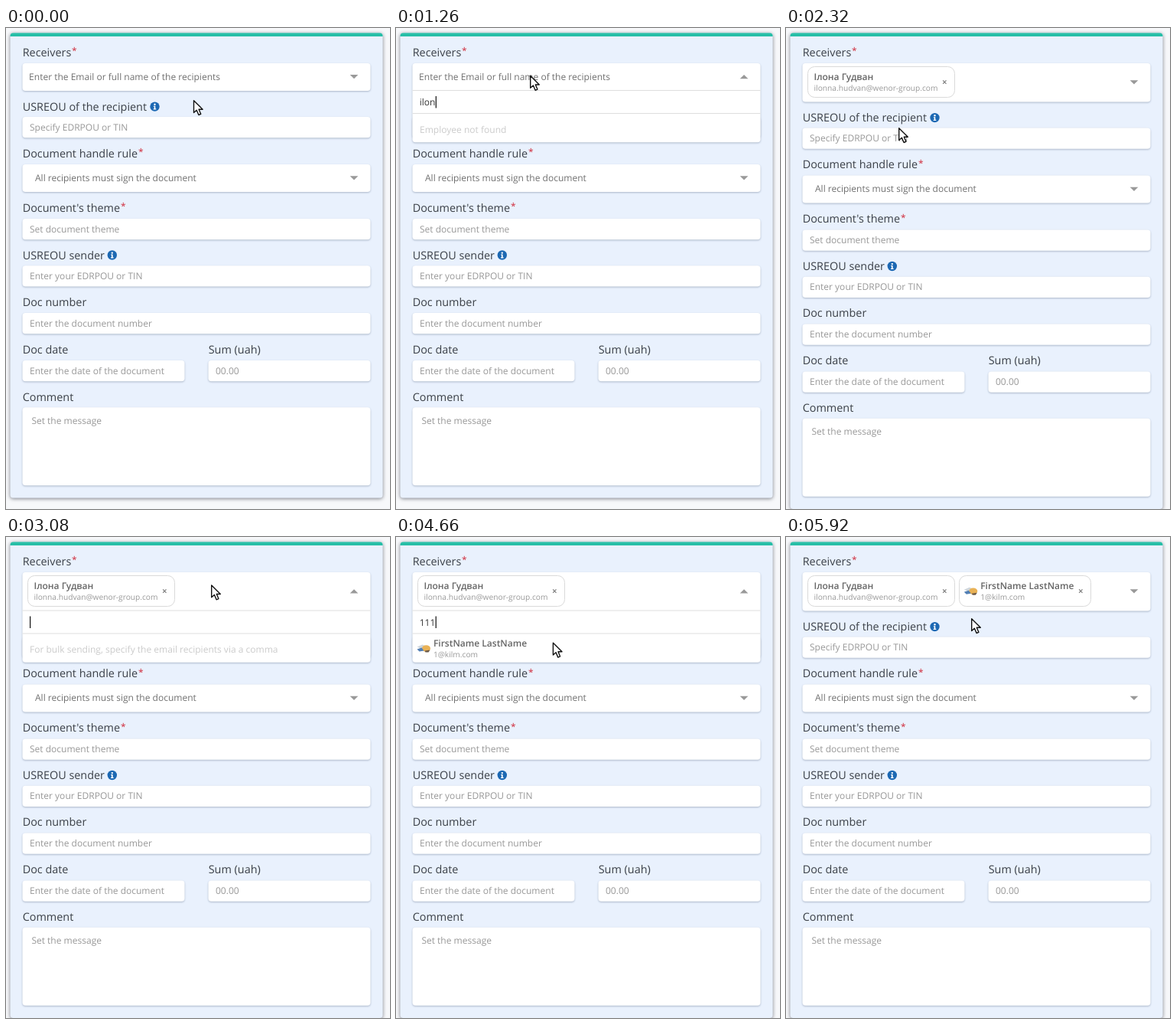
These frames come from a looping animation (502x628 px, 5.94 s). An HTML page:

```html
<!DOCTYPE html>
<html lang="en">
<head>
<meta charset="utf-8">
<title>Document form</title>
<style>
html, body { margin: 0; width: 100%; height: 100%; overflow: hidden; background: #f7f8fa; }
svg { display: block; width: 502px; height: 628px; font: 12.03px "Open Sans", "Noto Sans", sans-serif; text-rendering: geometricPrecision; }
.card { fill: #e9f1fd; filter: drop-shadow(0 1px 2.5px rgba(50, 55, 70, .65)); }
.field { fill: #fff; filter: drop-shadow(0 1px 1.1px rgba(50, 70, 100, .34)); }
.label { font-size: 14.4px; fill: #3b4047; }
.star { font-size: 12px; fill: #d02c3c; }
.hint { fill: #989898; }
.value { fill: #707070; }
.faint { fill: #cbcbcb; }
.typed { fill: #333; }
.name { font-weight: 600; fill: #666; }
.mail { font-size: 10.2px; fill: #999; }
.chip { fill: #fff; stroke: #dadada; }
.cross { stroke: #777; stroke-width: 1.1; }
.line { stroke: #dedede; }
.arrow { fill: #999; }
</style>
</head>
<body>
<svg id="stage" viewBox="0 0 502 628"></svg>
<script>
const LOOP = 5940;
const SHIFT = 14.5;
const stage = document.getElementById('stage');

function add(parent, tag, attrs, text) {
  const el = document.createElementNS('http://www.w3.org/2000/svg', tag);
  for (const key in attrs) el.setAttribute(key, attrs[key]);
  if (text) el.textContent = text;
  parent.append(el);
  return el;
}
const group = parent => add(parent, 'g', {});
const text = (parent, cls, x, y, str) => add(parent, 'text', { class: cls, x, y }, str);
const box = (parent, x, y, width, height, cls = 'field', rx = 4) =>
  add(parent, 'rect', { class: cls, x, y, width, height, rx });
const path = (parent, d, attrs) => add(parent, 'path', { d, ...attrs });
const move = (el, x, y) => el.setAttribute('transform', `translate(${x} ${y})`);
const show = (el, on) => el.setAttribute('visibility', on ? 'visible' : 'hidden');

function info(parent, x, y) {
  add(parent, 'circle', { cx: x, cy: y, r: 6.2, fill: '#1c68b3' });
  path(parent, `M${x - 1.6} ${y - .9}h2.4v3.6h1v1.2h-3.6v-1.2h1v-2.4h-.8z`, { fill: '#fff' });
  add(parent, 'circle', { cx: x, cy: y - 2.9, r: 1.2, fill: '#fff' });
}

// Card
const card = group(stage);
const shade = box(card, 5.5, 6.5, 487, 607, 'card', 4);
path(card, 'M5.5 11v-.5a4 4 0 0 1 4-4h479a4 4 0 0 1 4 4v.5z', { fill: '#27bfa7' });
text(card, 'label', 21.7, 36.6, 'Receivers');
text(card, 'star', 86, 34, '*');

// Everything below the receivers field
const rest = group(stage);
const fields = [
  // label, baseline, field top, height, placeholder, placeholder x, baseline, left, width
  ['USREOU of the recipient', 107.6, 116, 27.2, 'Specify EDRPOU or TIN', 31, 133.6],
  ['Document handle rule', 168.6, 178, 36, 'All recipients must sign the document', 38, 199.7],
  ["Document's theme", 239.6, 249, 27.2, 'Set document theme', 31, 266.6],
  ['USREOU sender', 301.5, 310.2, 27.2, 'Enter your EDRPOU or TIN', 31, 327.8],
  ['Doc number', 362.8, 372, 27.2, 'Enter the document number', 31, 389.7],
  ['Doc date', 424.7, 434, 27.2, 'Enter the date of the document', 31, 451.7, 21.5, 212],
  ['Sum (uah)', 424.7, 434, 27.2, '00.00', 274, 451.7, 264.5, 212],
  ['Comment', 486.5, 495.2, 102, 'Set the message', 33.4, 516.6]
];
for (const [label, ly, top, h, hint, hx, hy, left = 21.5, w = 455] of fields) {
  text(rest, 'label', left + .2, ly, label);
  box(rest, left, top, w, h);
  text(rest, h === 36 ? 'value' : 'hint', hx, hy, hint);
}
text(rest, 'star', 173, 166, '*');
text(rest, 'star', 150, 237, '*');
info(rest, 194.5, 102.6);
info(rest, 138.8, 296.5);
path(rest, 'M449.7 193.2h10.6l-5.3 5.2z', { class: 'arrow' });

// Receivers field with its drop-down
const receivers = box(stage, 21.5, 46, 455, 36);
const prompt = text(stage, 'value', 30.1, 67.8, 'Enter the Email or full name of the recipients');
const drop = group(stage);
path(drop, 'M21.5 81.5h455M21.5 111.5h455', { class: 'line' });
const typed = text(drop, 'typed', 30.7, 101, '');
const caret = add(drop, 'rect', { y: 89, width: 1.2, height: 15.5, fill: '#111' });
const note = text(drop, 'faint', 31, 136.8, '');
const toggle = path(stage, 'M-5.3 -2.6h10.6l-5.3 5.2z', { class: 'arrow' });
const spinner = group(stage);
add(spinner, 'circle', { r: 7.6, fill: 'none', stroke: '#d9d9d9', 'stroke-width': 2 });
path(spinner, 'M-5.4 5.4A7.6 7.6 0 0 1 -5.4 -5.4', { fill: 'none', stroke: '#444', 'stroke-width': 2 });

const people = [
  { name: 'Ілона Гудван', mail: 'ilonna.hudvan@wenor-group.com', x: 28.5, w: 192 },
  { name: 'FirstName LastName', mail: '1@kilm.com', x: 226.5, w: 172, pic: true }
];
function avatar(parent, x, y) {
  const g = group(parent);
  move(g, x, y);
  path(g, 'M-9 -2l7-3 5 2-5 4z', { fill: '#cfd6dc' });
  add(g, 'ellipse', { cx: 3, cy: 0, rx: 5.5, ry: 4.2, fill: '#e9b256' });
  path(g, 'M-9 1l6-2 3 4-6 1z', { fill: '#527fb4' });
  path(g, 'M1 3l7-1-2 3h-4z', { fill: '#6d5a48' });
}
function person(parent, { name, mail, pic }, x, y) {
  if (pic) avatar(parent, x + 6, y + 3);
  const tx = x + (pic ? 18.4 : 0);
  text(parent, 'name', tx, y, name);
  text(parent, 'mail', tx, y + 14.6, mail);
}
for (const p of people) {
  p.chip = group(stage);
  box(p.chip, p.x, 50.5, p.w, 40, 'chip', 9);
  person(p.chip, p, p.x + (p.pic ? 9.3 : 8), 67.8);
  const cx = p.x + p.w - 13.2;
  path(p.chip, `M${cx - 2.2} 68.4l4.4 4.4m0 -4.4l-4.4 4.4`, { class: 'cross' });
  p.item = group(drop);
  person(p.item, p, 30.5, 128);
}

// Pointers
const arrow = path(stage, 'M0 0v15.8l3.7 -3.3 2.7 6.3 2.8 -1.2 -2.6 -6.1h5z',
  { fill: '#fff', stroke: '#111', 'stroke-width': 1.4, 'stroke-linejoin': 'round' });
const beam = group(stage);
for (const [stroke, width] of [['#fff', 4], ['#111', 2]])
  path(beam, 'M-3.5 -7.5h7M0 -7.5v15M-3.5 7.5h7', { stroke, 'stroke-width': width, fill: 'none' });

const BULK = 'For bulk sending, specify the email recipients via a comma';
const NONE = 'Employee not found';
const LOAD = 'Loading..';
// time, chips, open, typed text, note, listed person
const states = [
  [0, 0, false],
  [800, 0, true, '', BULK],
  [1260, 0, true, 'ilon', NONE],
  [1440, 0, true, 'ilon', LOAD],
  [1700, 0, true, 'ilon', '', 0],
  [2100, 1, false],
  [2900, 1, true, '', BULK],
  [3260, 1, true, '1', BULK],
  [3440, 1, true, '11', BULK],
  [3640, 1, true, '111', NONE],
  [3820, 1, true, '111', LOAD],
  [4440, 1, true, '111', '', 1],
  [4800, 2, false]
];
// time, x, y of the pointer
const route = [
  [0, 245.5, 94.7], [20, 245.5, 94.7], [700, 175.7, 62.5], [1440, 175.7, 62.5],
  [1960, 147.7, 130.7], [2320, 147.7, 130.7], [2860, 268.7, 63], [3820, 268.7, 63],
  [4120, 200.7, 109.7], [4440, 200.7, 109.7], [4720, 206, 142], [4800, 206, 142],
  [5140, 211.7, 124.2], [5180, 211.7, 124.2], [5920, 242.7, 106.7], [LOOP, 242.7, 106.7]
];

function pointer(t) {
  const i = route.findIndex(p => p[0] > t);
  const [t0, x0, y0] = route[i - 1], [t1, x1, y1] = route[i];
  const k = (t - t0) / (t1 - t0), e = k * k * (3 - 2 * k);
  return [x0 + (x1 - x0) * e, y0 + (y1 - y0) * e];
}

let current;
function apply(state) {
  const [, chips, open, word = '', message = '', listed] = state;
  const dy = chips ? SHIFT : 0;
  move(rest, 0, dy);
  move(drop, 0, dy);
  shade.setAttribute('height', 607 + dy);
  receivers.setAttribute('height', (open ? 103.3 : 36) + dy);
  show(prompt, !chips);
  drop.style.display = open ? '' : 'none';
  typed.textContent = word;
  caret.setAttribute('x', 31 + (word ? typed.getComputedTextLength() : 0));
  note.textContent = message;
  toggle.setAttribute('transform', `translate(455 ${chips ? 70.8 : 63.6}) scale(1 ${open ? -1 : 1})`);
  people.forEach((p, i) => {
    show(p.chip, chips > i);
    show(p.item, listed === i);
  });
  show(spinner, message === LOAD);
}

function render(t) {
  const state = states.findLast(s => s[0] <= t);
  if (state !== current) apply(current = state);
  const dy = state[1] ? SHIFT : 0;
  spinner.setAttribute('transform', `translate(431.2 ${dy ? 71 : 63.7}) rotate(${(t - 3900) * .45})`);
  const [x, y] = pointer(t);
  const editing = state[2] && y > 82 + dy && y < 111 + dy;
  show(arrow, !editing);
  show(beam, editing);
  move(arrow, x, y);
  move(beam, x, y);
}

const start = performance.now();
function tick() {
  render((performance.now() - start) % LOOP);
  requestAnimationFrame(tick);
}
tick();
</script>
</body>
</html>
```
